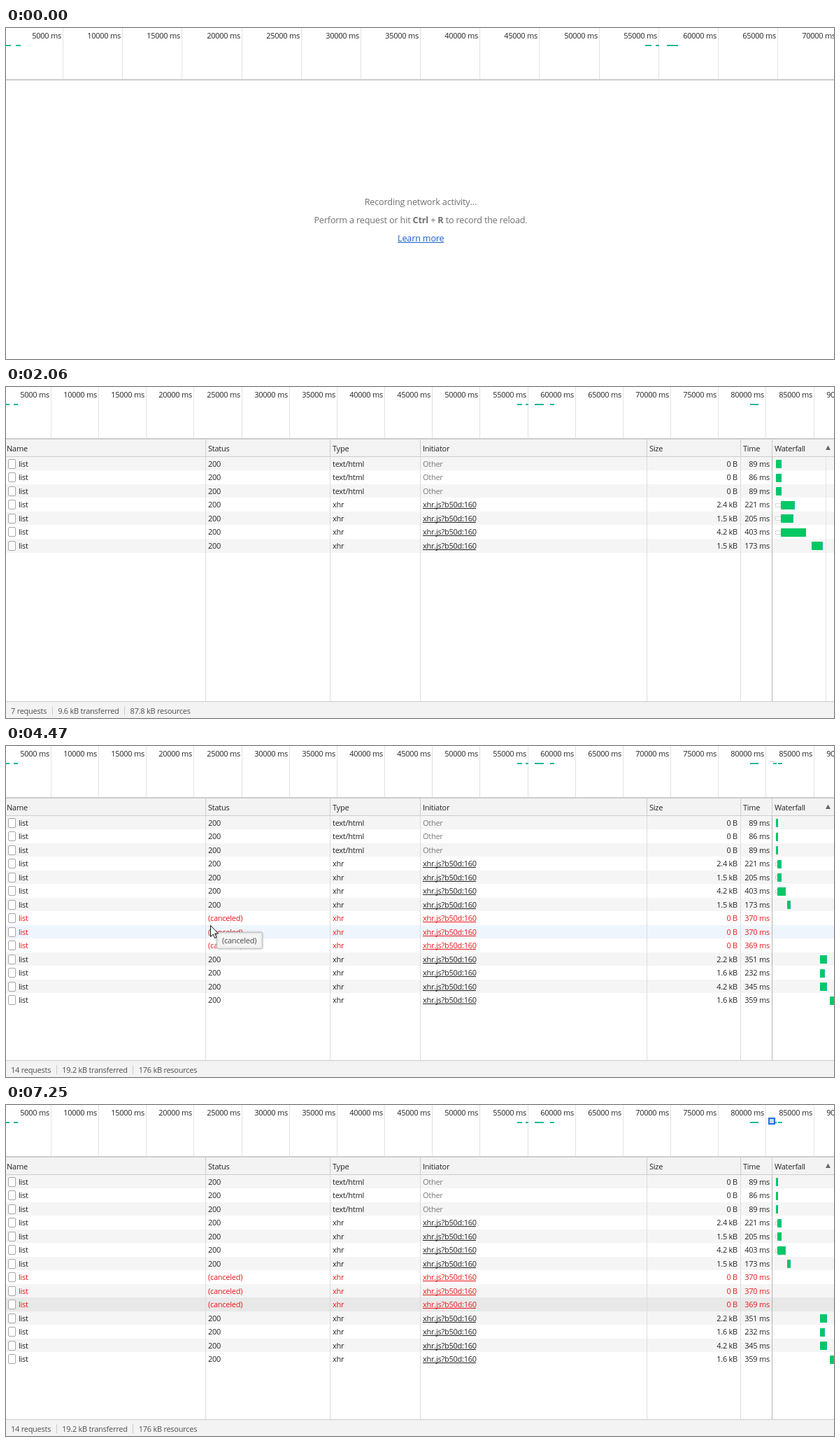
An HTML page with a canvas for the animation above (7.34 s loop, 1184 by 473 pixels).

```html
<!DOCTYPE html>
<html lang="en">
<head>
<meta charset="utf-8">
<title>Network panel</title>
<style>
  html, body { margin: 0; width: 100%; height: 100%; overflow: hidden; background: #fff; }
  canvas { display: block; }
</style>
</head>
<body>
<canvas id="stage" width="1184" height="473"></canvas>
<script>
const W = 1184, LOOP = 7340, ROW = 19.5, TOP = 100;
const INK = '#242424', GREY = '#7c7c7c', RED = '#e8191c', LINE = '#cccccc';
const ctx = document.getElementById('stage').getContext('2d');

// Requests: start and wait are in milliseconds on the waterfall axis.
const pending = { status: '(pending)', size: '0 B' };
const waiting = { ...pending, html: true };
const html = ms => ({ status: '200', size: '0 B', ms, start: 8, html: true });
const xhr = (size, ms, start = 93, wait = start === 93) => ({ status: '200', size, ms, start, wait });
const canceled = ms => ({ status: '(canceled)', size: '0 B', ms, failed: true });

const preflights = [html(89), html(86), html(89)];
const firstThree = [xhr('2.4 kB', 221), xhr('1.5 kB', 205), xhr('4.2 kB', 403)];
const loaded = [...preflights, ...firstThree, xhr('1.5 kB', 173, 575)];
const aborted = [...loaded, canceled(370), canceled(370), canceled(369)];
const small = xhr('402 B', 234, 2250);
const lastThree = [xhr('2.2 kB', 351, 2215), xhr('1.6 kB', 232, 2215), xhr('4.2 kB', 345, 2215)];
const arriving = rest => [pending, html(89), pending, html(86), html(89), ...rest];

// [time, rows, transferred, resources, waterfall px per ms, grid line]
const phases = [
  [960, [pending, waiting, pending, waiting, waiting, pending], '0 B', '0 B', .15, 1172],
  [1040, arriving([pending]), '0 B', '0 B', .15, 1172],
  [1290, arriving([firstThree[1]]), '1.5 kB', '7.4 kB', .15, 1172],
  [1590, arriving([firstThree[1], pending]), '1.5 kB', '7.4 kB', .15, 1172],
  [1660, [...preflights, ...firstThree, pending], '8.1 kB', '80.4 kB', .14, 1172],
  [1980, loaded, '9.6 kB', '87.8 kB', .09, 1172],
  [3070, [...loaded, pending, pending, pending], '9.6 kB', '87.8 kB', .045, 1172],
  [3370, [...aborted, pending], '9.6 kB', '87.8 kB', .045, 1172],
  [3460, [...aborted, pending, pending, pending], '9.6 kB', '87.8 kB', .04, 1166],
  [3690, [...aborted, small, pending, pending], '10.0 kB', '95.1 kB', .0355, 1166],
  [3920, [...aborted, small, pending, pending, pending], '10.0 kB', '95.1 kB', .0355, 1166],
  [4240, [...aborted, ...lastThree, pending], '17.6 kB', '169 kB', .029],
  [4320, [...aborted, ...lastThree, xhr('1.6 kB', 359, 2690)], '19.2 kB', '176 kB', .029]
];

// [time, x, y]; an entry without a place hides the pointer.
const pointer = [
  [70, 1019, 179], [140, 770, 250], [200, 510, 325], [270, 13, 458], [340],
  [4390, 312, 300], [4470, 292, 256], [4700, 296, 252], [4780, 300, 249],
  [5250, 350, 268], [5320, 430, 292], [5400, 484, 304],
  [5550, 465, 296], [5630, 430, 280], [5700, 400, 268], [5780, 386, 262],
  [6090, 382, 270], [6170, 379, 277], [6560, 450, 300], [6640, 744, 392], [6720]
];

// Selected row over time.
const selection = [[4850, 7], [5780, 8], [6260, 9]];

// Overview strokes: [x, width, first visible at]
const activity = [
  [0, 5.4, 0], [10.9, 5.7, 0], [731, 7.2, 0], [743, 4, 0], [756, 13, 0],
  [778, 6, 960], [1064, 5, 1040], [1064, 12, 1660], [1097, 5, 3690], [1104, 6, 4240]
];

const latest = (list, t) => list.filter(item => item[0] <= t).pop();

function rect(x, y, w, h, color) {
  ctx.fillStyle = color;
  ctx.fillRect(x, y, w, h);
}

function font(size = 11, spacing = -.25, weight = 400) {
  ctx.font = `${weight} ${size}px "Open Sans", "Noto Sans", sans-serif`;
  ctx.letterSpacing = spacing + 'px';
}

function text(s, x, y, color = INK, align = 'left') {
  ctx.fillStyle = color;
  ctx.textAlign = align;
  ctx.fillText(s, x, y);
  return ctx.measureText(s).width;
}

function link(s, x, y, color) {
  const width = text(s, x, y, color);
  rect(x, y + 1, Math.floor(width), 1, color);
}

function box(x, y, w, h, radius, fill, stroke) {
  ctx.beginPath();
  ctx.roundRect(x, y, w, h, radius);
  ctx.fillStyle = fill;
  ctx.fill();
  ctx.strokeStyle = stroke;
  ctx.stroke();
}

function drawOverview(t) {
  const zoom = t < 960 ? 1.25 : 1;
  const [first, step] = t < 960 ? [81, 85.18] : [63.9, 68.17];
  for (let i = 0; i < 18; i++) {
    const x = Math.round(first + i * step);
    rect(x, 0, 1, 73, '#e2e2e2');
    text((i + 1) * 5000 + ' ms', x - 2, 15, INK, 'right');
  }
  for (const [x, w, from] of activity)
    if (t >= from) rect(Math.round(x * zoom), 24, Math.round(w * zoom), 2, '#12b998');
  if (t >= 3370) rect(1092, 22, 6, 1, '#cccccc');
  if (t >= 4850) {
    ctx.lineWidth = 2;
    box(1091, 19, 8, 8, 0, '#cfd8e3', '#1a73e8');
    ctx.lineWidth = 1;
  }
  rect(0, 73, W, 2, LINE);
}

function drawEmpty() {
  const color = '#707070';
  const body = weight => font(12.6, -.15, weight);
  body();
  text('Recording network activity…', 593, 253, color, 'center');
  const parts = [['Perform a request or hit '], ['Ctrl', 700], [' + '], ['R', 700], [' to record the reload.']];
  const width = ([s, weight]) => (body(weight), ctx.measureText(s).width);
  let x = 593 - parts.reduce((sum, part) => sum + width(part), 0) / 2;
  for (const part of parts) {
    const w = width(part);
    text(part[0], x, 279, color);
    x += w;
  }
  body();
  link('Learn more', Math.round(593 - ctx.measureText('Learn more').width / 2), 305, '#1a5fc8');
}

function drawBar({ ms, start, wait }, y, scale) {
  const x = Math.max(1101, Math.round(1100 + start * scale));
  const w = Math.max(3, Math.round(ms * scale));
  if (wait) box(1100.5, y + 3.5, x - 1100.5, 5, 0, '#fff', '#d4d4d4');
  ctx.beginPath();
  ctx.roundRect(x, y, w, 12, 1);
  ctx.fillStyle = '#00c864';
  ctx.fill();
  rect(x + w - 1, y, 1, 12, '#1cb0b8');
}

function drawRow(row, i, fill, selected, scale) {
  const y = TOP + i * ROW, base = Math.floor(y + 14);
  const ink = row.failed ? RED : INK;
  const soft = row.status === '(pending)' ? GREY : ink;
  rect(0, Math.floor(y), W, 20, fill);
  box(3.5, base - 10.5, 10, 13, 1.5, '#fff', '#a6a6a6');
  text('list', 18, base, ink);
  text(row.status, 289, base, soft);
  text(row.html ? 'text/html' : 'xhr', 467, base, ink);
  if (row.html) text('Other', 596, base, GREY);
  else link('xhr.js?b50d:160', 596, base, selected ? '#fff' : ink);
  text(row.size, 1046, base, ink, 'right');
  if (row.ms) text(row.ms + ' ms', 1092, base, ink, 'right');
  else text('Pendi…', 1054, base, GREY);
  if (row.start) drawBar(row, Math.floor(y + 4.5), scale);
}

function drawTable(t, [, rows, transferred, resources, scale, grid], place) {
  const hover = place ? Math.floor((place[2] - TOP) / ROW) : -1;
  const selected = (latest(selection, t) || [])[1];
  const blurred = t >= 7250;

  rows.forEach((row, i) => {
    let fill = i % 2 ? '#ffffff' : '#f5f5f5';
    if (i === hover) fill = '#eff5fd';
    if (i === selected) fill = blurred ? '#e8e8e8' : '#ffeeee';
    drawRow(row, i, fill, i === selected && !blurred, scale);
  });

  rect(0, 75, W, 24, '#f3f3f3');
  rect(0, 99, W, 1, LINE);
  const columns = [[0, 'Name'], [285, 'Status'], [463, 'Type'], [592, 'Initiator'],
    [916, 'Size'], [1050, 'Time'], [1095, 'Waterfall']];
  for (const [x, title] of columns) {
    if (x) {
      rect(x, 100, 1, 349, x === 1095 ? '#b4b4b4' : '#dcdcdc');
      rect(x, 75, 1, 25, LINE);
    }
    text(title, x ? x + 4 : 1, 92);
  }
  if (grid) rect(grid, 100, 1, 349, '#e6e6e6');
  ctx.fillStyle = '#666';
  ctx.fill(new Path2D('M1172 90L1175.5 83.5L1179 90Z'));

  rect(0, 449, W, 24, '#f3f3f3');
  rect(0, 449, W, 1, LINE);
  const gap = 8;
  let x = 7;
  [rows.length + ' requests', transferred + ' transferred', resources + ' resources'].forEach((s, i) => {
    if (i) {
      rect(Math.floor(x), 456, 1, 13, LINE);
      x += gap;
    }
    x += text(s, x, 467, '#505050') + gap;
  });
}

function drawTooltip(s, x, y, w, alpha) {
  ctx.globalAlpha = alpha;
  ctx.shadowColor = 'rgba(0,0,0,.25)';
  ctx.shadowBlur = 3;
  box(x + .5, y + .5, w, 23, 2, '#f4f4f4', '#c8c8c8');
  ctx.shadowBlur = 0;
  ctx.shadowColor = 'transparent';
  text(s, x + 8, y + 16, '#505050');
  ctx.globalAlpha = 1;
}

function drawPointer([, x, y]) {
  ctx.save();
  ctx.translate(x + .5, y + .5);
  const arrow = new Path2D('M0 0V16L3.7 12.6L6.2 18L8.6 17L6.2 11.5H11Z');
  ctx.fillStyle = '#fff';
  ctx.fill(arrow);
  ctx.strokeStyle = '#111';
  ctx.stroke(arrow);
  ctx.restore();
}

function draw(now) {
  const t = now % LOOP;
  const phase = latest(phases, t);
  const last = latest(pointer, t);
  const place = last && last.length > 1 ? last : null;
  rect(0, 0, W, 473, '#fff');
  ctx.lineWidth = 1;
  font();
  drawOverview(t);
  if (phase) drawTable(t, phase, place);
  else drawEmpty();
  font();
  if (t >= 4470 && t < 4700) drawTooltip('(canceled)', 301, 266, 65, 1);
  if (t >= 5400 && t < 5550) drawTooltip('xhr', 484, 307, 28, .12);
  if (place) drawPointer(place);
  requestAnimationFrame(draw);
}
requestAnimationFrame(draw);
</script>
</body>
</html>
```
